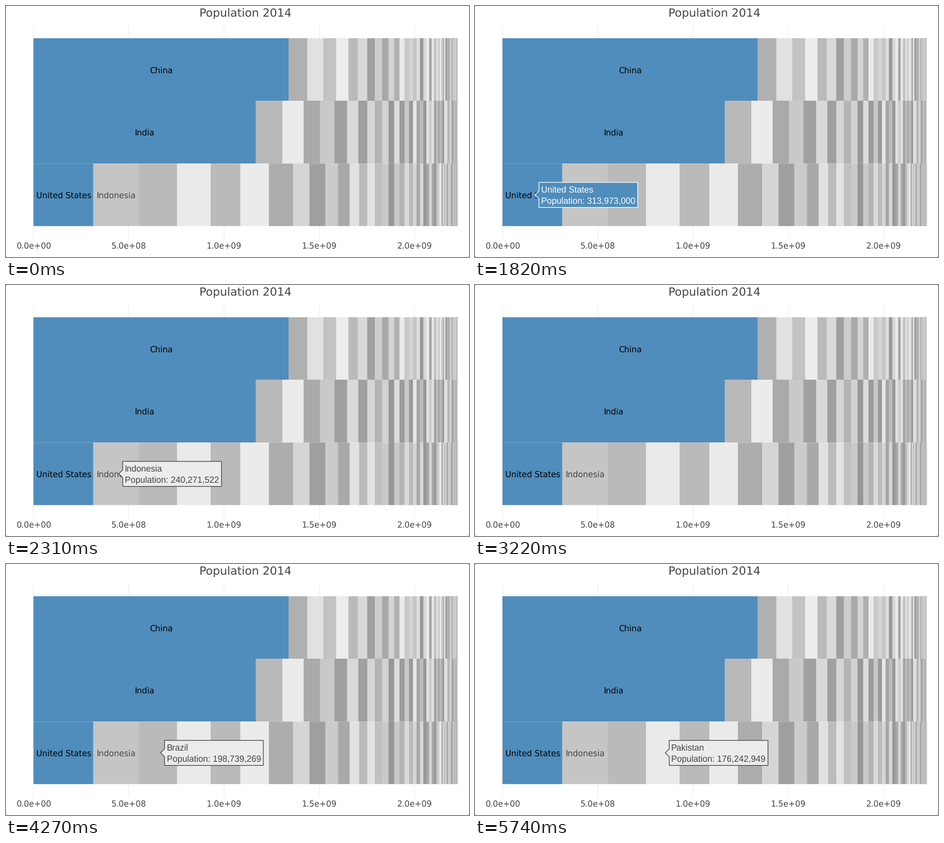
A matplotlib script that plays this animation: 826 px wide and 448 px high, repeating every 5.81 s.

```python
import random
import matplotlib.pyplot as plt
from matplotlib.animation import FuncAnimation
from matplotlib.patches import FancyBboxPatch, Polygon, Rectangle

W, H, DPI = 826, 448, 100
STEP, FRAMES = 70, 83
BLUE, INK, PALE = "#508dbc", "#444444", "#ececec"
LEFT, RIGHT = 49, 806.5
ROW_EDGES = [(57.5, 169), (169, 281), (281.2, 392.8)]
plt.rcParams["text.hinting"] = "none"

fig = plt.figure(figsize=(W / DPI, H / DPI), dpi=DPI, facecolor="#b0b0b0")
ax = fig.add_axes([0, 0, 1, 1])
ax.set(xlim=(0, W), ylim=(H, 0))
ax.axis("off")


def label(x, y, text, px=14.5, color=INK, font="DejaVu Sans", ha="center", z=4):
    return ax.text(x, y, text, fontsize=px * 72 / DPI, color=color, family=font,
                   ha=ha, va="baseline", zorder=z)


def bar(x0, x1, row, color):
    top, bottom = ROW_EDGES[row]
    ax.add_patch(Rectangle((x0, top), x1 - x0, bottom - top, fc=color, lw=0,
                           snap=False, zorder=2))


def grey(level):
    return (level / 255,) * 3


# window background with slightly rounded corners
ax.add_patch(FancyBboxPatch((3, 3), W - 6, H - 6, boxstyle="round,pad=3,rounding_size=3",
                            fc="white", lw=0, zorder=0))

for i in range(5):
    x = LEFT + 170 * i
    ax.plot([x, x], [35, 417], color="#eeeeee", lw=1.2 * 72 / DPI, zorder=1,
            snap=False, solid_capstyle="butt")
    label(x, 432.5, f"{i * 5e8:.1e}")
label(427, 19, "Population 2014", px=20.3)

# each row: left edges of the large grey bars, then widths shared by all rows
SHARED = [644.5, 658, 671, 682.5, 692.5, 702, 711, 719, 726, 732.5, 738.5]
EDGES = [
    [504, 537.5, 566, 589, 611, 627.5],
    [445.5, 493, 531, 560, 586, 608.5, 628.5],
    [155.5, 237.5, 305, 365, 418, 469, 512, 541.5, 569.5, 592.5, 613, 630],
]
LEVELS = [
    [176, 225, 195, 236, 186, 217, 160, 204, 168, 212, 176, 234, 200, 213, 197, 222],
    [185, 235, 170, 201, 160, 217, 160, 213, 180, 210, 152, 220, 156, 200, 154, 230, 165],
    [197, 186, 234, 186, 235, 173, 213, 159, 203, 169, 225, 187, 226, 192, 202, 150,
     200, 181, 218, 187, 213, 166],
]
TAIL = [152, 225, 176, 204, 160, 190, 215, 168, 234]

rng = random.Random(14)
for row, (edges, levels) in enumerate(zip(EDGES, LEVELS)):
    start = SHARED[-1]
    tail = [RIGHT - (RIGHT - start) * 0.912 ** k for k in range(1, 42)]
    xs = edges + SHARED + tail + [RIGHT]
    shades = list(levels)
    while len(shades) < len(xs):
        shades.append(rng.choice([t for t in TAIL if abs(t - shades[-1]) > 14]))
    bar(LEFT, xs[0] + 1, row, BLUE)
    for x0, x1, shade in zip(xs, xs[1:], shades):
        bar(x0, min(x1 + 1, RIGHT), row, grey(shade))

label(276.7, 119.5, "China", color="black")
label(247.3, 231, "India", color="black")
label(103, 343, "United States", color="black")
label(197, 343, "Indonesia")


def tooltip(tip, y, name, count, fill, ink):
    left = tip + 7.1
    lines = [label(left + 3.6, y + dy, text, 15.5, ink, "Liberation Sans", "left", 6)
             for dy, text in ((-4.3, name), (16, f"Population: {count:,}"))]
    right = left + lines[1].get_window_extent().width + 8
    top, bottom = y - 22.2, y + 22.5
    box = Polygon([(tip, y), (left, y - 7), (left, top), (right, top),
                   (right, bottom), (left, bottom), (left, y + 7)],
                  fc=fill, ec=ink, lw=1.25 * 72 / DPI, joinstyle="miter",
                  snap=False, zorder=5)
    ax.add_patch(box)
    return [box] + lines


# (appears ms, disappears ms, artists)
TOOLTIPS = [
    (210, 560, tooltip(251.6, 225.3, "India", 1166079217, BLUE, "white")),
    (560, 2170, tooltip(107, 337, "United States", 313973000, BLUE, "white")),
    (2170, 3150, tooltip(201.2, 337, "Indonesia", 240271522, PALE, INK)),
    (3430, 4550, tooltip(275.8, 337, "Brazil", 198739269, PALE, INK)),
    (4550, 5810, tooltip(339.4, 337, "Pakistan", 176242949, PALE, INK)),
]


def update(frame):
    now = frame * STEP
    for start, end, artists in TOOLTIPS:
        for artist in artists:
            artist.set_visible(start <= now < end)
    return [a for _, _, artists in TOOLTIPS for a in artists]


anim = FuncAnimation(fig, update, frames=FRAMES, interval=STEP, repeat=True,
                     repeat_delay=0, blit=False)
plt.show()
```
